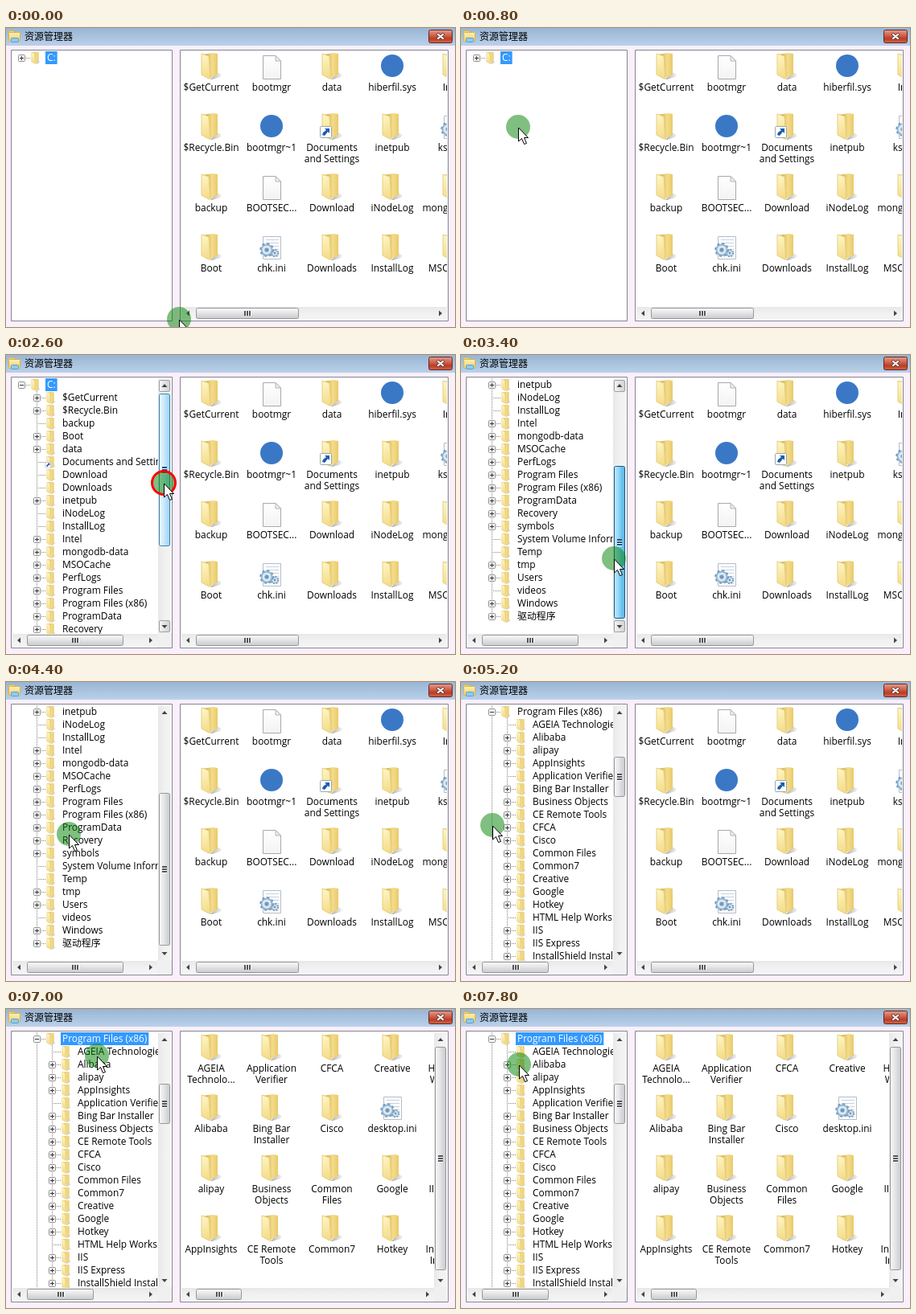
Recreate the animation shown at these times as an HTML page with a canvas. Size 558x372 px, loop 8000 ms.

```html
<!DOCTYPE html>
<html lang="zh">
<head>
<meta charset="utf-8">
<title>资源管理器</title>
<style>
html, body { margin: 0; width: 100%; height: 100%; overflow: hidden; }
canvas { display: block; width: 100%; height: 100%; }
</style>
</head>
<body>
<canvas id="stage" width="558" height="372"></canvas>
<script>
const ctx = document.getElementById('stage').getContext('2d');
const STEP = 200, STEPS = 40;
const FAMILY = '"Open Sans", "Noto Sans CJK SC", "Noto Sans CJK", sans-serif';
const FONT = '11.9px ' + FAMILY, TITLE_FONT = '12px ' + FAMILY;

// A leading "+" marks a folder that can be expanded.
const parse = list => list.split(',').map(s => ({ name: s.replace('+', ''), more: s[0] === '+' }));
const ROOT = parse('+$GetCurrent,+$Recycle.Bin,backup,+Boot,+data,Documents and Settings,Download,Downloads,+inetpub,' +
  'iNodeLog,InstallLog,+Intel,+mongodb-data,+MSOCache,+PerfLogs,+Program Files,+Program Files (x86),+ProgramData,' +
  '+Recovery,+symbols,System Volume Information,Temp,+tmp,+Users,videos,+Windows,+驱动程序');
const PROGRAMS = parse('AGEIA Technologies,+Alibaba,+alipay,+AppInsights,Application Verifier,+Bing Bar Installer,' +
  '+Business Objects,+CE Remote Tools,+CFCA,+Cisco,+Common Files,+Common7,+Creative,+Google,+Hotkey,' +
  'HTML Help Workshop,+IIS,+IIS Express,+InstallShield Installation Information');
const OPENED = 'Program Files (x86)';

// Icon grids run down the columns; "|" breaks a label into lines.
const DRIVE_GRID = ('$GetCurrent,$Recycle.Bin,backup,Boot,bootmgr,bootmgr~1,BOOTSEC...,chk.ini,data,Documents|and Settings,' +
  'Download,Downloads,hiberfil.sys,inetpub,iNodeLog,InstallLog,Intel,ksuser,mongod-data,MSOCache').split(',');
const PROGRAM_GRID = ('AGEIA|Technolo...,Alibaba,alipay,AppInsights,Application|Verifier,Bing Bar|Installer,Business|Objects,' +
  'CE Remote|Tools,CFCA,Cisco,Common|Files,Common7,Creative,desktop.ini,Google,Hotkey,HTML Help|Workshop,IIS,' +
  'IIS Express,InstallShield|Installati...').split(',');
const ICONS = { bootmgr: page, 'BOOTSEC...': page, 'bootmgr~1': badge, 'hiberfil.sys': badge,
  'chk.ini': settings, ksuser: settings, 'desktop.ini': settings };

// Pointer stops: step, x, y
const POINTER = [[0, 215, 362], [6, 20, 39], [8, 20, 39], [12, 195, 157], [13, 196, 159], [17, 190, 253], [18, 190, 253],
  [24, 39, 166], [25, 39, 166], [26, 39, 178], [30, 112, 41], [32, 110, 39], [33, 110, 39], [36, 115, 67], [39, 72, 69]];

function fillRect(x, y, w, h, color) {
  ctx.fillStyle = color;
  ctx.fillRect(x, y, w, h);
}

function gradient(x0, y0, x1, y1, ...colors) {
  const g = ctx.createLinearGradient(x0, y0, x1, y1);
  colors.forEach((c, i) => g.addColorStop(i / (colors.length - 1), c));
  return g;
}

function poly(points, fill, stroke) {
  ctx.beginPath();
  for (let i = 0; i < points.length; i += 2) ctx.lineTo(points[i], points[i + 1]);
  ctx.closePath();
  if (fill) { ctx.fillStyle = fill; ctx.fill(); }
  if (stroke) { ctx.strokeStyle = stroke; ctx.stroke(); }
}

function disc(x, y, r, fill) {
  ctx.beginPath();
  ctx.arc(x, y, r, 0, Math.PI * 2);
  ctx.fillStyle = fill;
  ctx.fill();
}

function roundBox(x, y, w, h, r, fill, stroke) {
  ctx.beginPath();
  ctx.roundRect(x, y, w, h, r);
  ctx.fillStyle = fill;
  ctx.fill();
  ctx.strokeStyle = stroke;
  ctx.stroke();
}

function text(s, x, y, color = '#000', align = 'left', font = FONT) {
  ctx.font = font;
  ctx.fillStyle = color;
  ctx.textAlign = align;
  ctx.fillText(s, x, y + 4);
}

function at(x, y, scale, draw) {
  ctx.save();
  ctx.translate(x, y);
  ctx.scale(scale, scale);
  draw();
  ctx.restore();
}

function clipped(x, y, w, h, draw) {
  ctx.save();
  ctx.beginPath();
  ctx.rect(x, y, w, h);
  ctx.clip();
  draw();
  ctx.restore();
}

function folder() {
  poly([-1, 17, 7, 8, 13, 11, 11, 14, 1, 17], gradient(0, 0, 13, 0, 'rgba(80,80,80,.45)', 'rgba(120,120,120,.1)'));
  poly([-11, -14, 2, -16, 8, -15, 8, 11, -1, 15], gradient(-6, 0, 8, 0, '#d9b44c', '#f3dc8c', '#e9ca6a'));
  poly([-12, -15, -3, -12, -1, 16, -3, 16, -12, 11], gradient(-12, -14, 0, 14, '#fff6c6', '#f3db85'), '#e6cd82');
}

function page() {
  poly([-10.5, -12.5, 5, -12.5, 11.5, -6, 11.5, 16.5, -10.5, 16.5], gradient(0, -12, 0, 16, '#fff', '#f3f3f3'), '#a9a9a9');
  poly([5, -12.5, 5, -6, 11.5, -6], '#eee', '#b5b5b5');
}

function gear(x, y, r) {
  ctx.setLineDash([r * .4, r * .385]);
  ctx.lineWidth = 2.5;
  ctx.strokeStyle = '#6a93b5';
  ctx.beginPath();
  ctx.arc(x, y, r, 0, 7);
  ctx.stroke();
  ctx.setLineDash([]);
  ctx.lineWidth = 1;
  disc(x, y, r, '#8fb2cf');
  disc(x, y, r * .75, '#dbe9f3');
  disc(x, y, r * .35, '#7499b7');
}

function settings() {
  poly([-10.5, -12.5, 11.5, -12.5, 11.5, 15.5, -10.5, 15.5], '#fdfdfd', '#b4bec9');
  for (let y = -9; y < 13; y += 4) fillRect(-7, y, 16, 1, '#c7d3e0');
  gear(4, 8, 4);
  gear(-6, 4, 7.5);
}

function badge() { disc(0, 0, 14, '#3a78c6'); }

function shortcut() {
  roundBox(-14.5, .5, 14, 14, 1, '#fff', '#9aa');
  poly([-9, 3, -3, 3, -3, 9, -5, 7, -9, 12, -12, 11, -11, 8, -7, 5], '#1c5cb0');
}

function dots(x0, y0, x1, y1) {
  ctx.setLineDash([1, 1]);
  ctx.strokeStyle = '#848484';
  ctx.beginPath();
  ctx.moveTo(x0, y0);
  ctx.lineTo(x1, y1);
  ctx.stroke();
  ctx.setLineDash([]);
}

function expander(x, y, open) {
  roundBox(x - 3.5, y - 4, 8, 8, 1, '#fff', '#8c8c8c');
  fillRect(x - 2, y - .5, 5, 1, '#333');
  if (!open) fillRect(x, y - 2.5, 1, 5, '#333');
}

// mode: 0 idle, 1 hovered, 2 pressed
function scrollbar(x, y, length, start, size, vertical, mode = 0) {
  const fills = [['#f7f7f7', '#ececee', '#d8d9dc', '#c9cacd'], ['#e8f6fd', '#d5effc', '#b4dff7', '#9ed3ee'],
    ['#c3e9fb', '#a1dcf8', '#6cc5f0', '#5bb4e0']];
  const edge = ['#979797', '#3c7fb1', '#18598a'][mode];
  ctx.save();
  vertical ? ctx.transform(0, 1, 1, 0, x, y) : ctx.translate(x, y);
  fillRect(0, 0, length, 16, gradient(0, 0, 0, 16, '#e8e8e8', '#f1f1f1', '#f4f4f4'));
  if (mode) for (const b of [1.5, length - 15.5])
    roundBox(b, 1.5, 14, 13, 1.5, gradient(0, 1, 0, 15, '#f8f8f8', '#e2e2e4', '#d0d1d4'), '#a0a0a0');
  poly([6, 8, 10, 4.5, 10, 11.5], '#444');
  poly([length - 6, 8, length - 10, 4.5, length - 10, 11.5], '#444');
  roundBox(start + .5, 1.5, size - 1, 13, 2, gradient(0, 1, 0, 15, ...fills[mode]), edge);
  const mid = Math.round(start + size / 2);
  for (let i = -4; i <= 2; i += 3) {
    fillRect(mid + i, 5, 2, 6, mode ? '#22506e' : '#555');
    fillRect(mid + i + 2, 5, 1, 6, '#fff');
  }
  ctx.restore();
}

function treeRows(step) {
  const rows = [{ name: 'C:', depth: 0, more: true, open: step >= 7 }];
  if (step < 7) return rows;
  ROOT.forEach((item, i) => {
    const open = item.name === OPENED && step >= 25;
    rows.push({ ...item, depth: 1, open, last: i === ROOT.length - 1 });
    if (open) PROGRAMS.forEach(p => rows.push({ ...p, depth: 2 }));
  });
  return rows;
}

function drawRow(row, y, selected) {
  const indent = 19 * row.depth, x = 19 + indent, textX = 51 + indent;
  if (row.depth) {
    dots(38.5, y - 8, 38.5, row.last ? y : y + 8);
    if (row.depth === 2) dots(57.5, y - 8, 57.5, y + 8);
  }
  dots(x, y + .5, x + 12, y + .5);
  if (row.more) expander(x, y + .5, row.open);
  at(37 + indent, y, .45, folder);
  if (row.name === 'Documents and Settings') at(37 + indent, y, .5, shortcut);
  if (selected) {
    ctx.font = FONT;
    fillRect(textX - 2, y - 8, ctx.measureText(row.name).width + 4, 16, '#3399ff');
  }
  text(row.name, textX, y, selected ? '#fff' : '#000');
}

function drawTree(step) {
  const drag = Math.min(1, Math.max(0, (step - 13) / 4));
  const inside = step >= 25;
  const first = inside ? 17 : Math.round(9 * drag);
  const selected = step >= 32 ? OPENED : 'C:';
  const expanded = step >= 7;
  clipped(8, 29, expanded ? 181 : 198, expanded ? 318 : 335, () =>
    treeRows(step).slice(first, first + 20).forEach((row, i) => drawRow(row, 37 + 16 * i, row.name === selected)));
  if (!expanded) return;
  const mode = step >= 14 && step <= 18 ? 2 : step === 12 || step === 13 ? 1 : 0;
  fillRect(188, 346, 18, 18, '#f0f0f0');
  scrollbar(8, 347, 180, 18, inside ? 83 : 120, false);
  if (inside) scrollbar(189, 30, 316, 63, 50, true);
  else scrollbar(189, 30, 316, 18 + 90 * drag, 190, true, mode);
}

function drawGrid(step) {
  const inside = step >= 33;
  const width = inside ? 314 : 330;
  clipped(218, 29, width, 318, () => (inside ? PROGRAM_GRID : DRIVE_GRID).forEach((label, i) => {
    const x = 255 + 75 * Math.floor(i / 4), y = 47 + 75 * (i % 4);
    at(x, y, 1, ICONS[label] || folder);
    if (label.startsWith('Documents')) at(x, y, 1, shortcut);
    label.split('|').forEach((line, n) => text(line, x, y + 27 + 14 * n, '#000', 'center'));
  }));
  scrollbar(218, 347, width, 18, inside ? 57 : 128, false);
  if (inside) {
    fillRect(532, 346, 16, 18, '#f0f0f0');
    scrollbar(532, 30, 316, 17, 278, true);
  }
}

function drawWindow() {
  fillRect(0, 0, 558, 372, '#faeffa');
  fillRect(0, 0, 558, 22, gradient(0, 0, 0, 22, '#99b5d3', '#a9c3df', '#bad1e9'));
  roundBox(3.5, 3.5, 7, 4, 1, '#f3d774', '#d9b34c');
  roundBox(3.5, 5.5, 14, 11, 1, gradient(0, 5, 0, 17, '#fff1b5', '#f0ce67'), '#d9b34c');
  roundBox(6.5, 12.5, 9, 5, 1, '#8fcbef', '#5d9fca');
  text('资源管理器', 23, 11, '#000', 'left', TITLE_FONT);
  roundBox(525.5, 2.5, 29, 16, 2, gradient(0, 2, 0, 19, '#e6a08c', '#d4705a', '#bd3c24', '#d36a4c'), '#5e2a2c');
  ctx.lineCap = 'round';
  for (const [color, width] of [['#6b3a3a', 4], ['#fff', 2.2]]) {
    ctx.strokeStyle = color;
    ctx.lineWidth = width;
    ctx.beginPath();
    ctx.moveTo(537, 8); ctx.lineTo(543, 13);
    ctx.moveTo(543, 8); ctx.lineTo(537, 13);
    ctx.stroke();
  }
  ctx.lineCap = 'butt';
  ctx.lineWidth = 1;
  roundBox(6.5, 27.5, 200, 337, 0, '#fff', '#828790');
  roundBox(216.5, 27.5, 333, 337, 0, '#fff', '#828790');
}

function pointerAt(step) {
  const i = Math.max(1, POINTER.findIndex(p => p[0] >= step));
  const [s0, x0, y0] = POINTER[i - 1], [s1, x1, y1] = POINTER[i];
  const u = (step - s0) / (s1 - s0);
  const e = s1 - s0 > 4 ? u * u * (3 - 2 * u) : u;
  return [Math.round(x0 + (x1 - x0) * e), Math.round(y0 + (y1 - y0) * e)];
}

function drawPointer(step) {
  const [x, y] = pointerAt(step);
  const pressed = [6, 24, 32].includes(step) || (step >= 13 && step <= 16);
  disc(x, y, 15, 'rgba(0,128,0,.5)');
  if (pressed) {
    ctx.beginPath();
    ctx.arc(x, y, 14.5, 0, Math.PI * 2);
    ctx.strokeStyle = '#f00';
    ctx.lineWidth = 3;
    ctx.stroke();
    ctx.lineWidth = 1;
  }
  at(x + .5, y + 1, 1, () =>
    poly([0, 0, 0, 17, 4, 13.5, 7, 20.5, 10, 19.5, 7, 12.5, 12, 12.5], '#fff', '#000'));
}

function frame(now) {
  const step = Math.floor(now / STEP) % STEPS;
  drawWindow();
  drawTree(step);
  drawGrid(step);
  drawPointer(step);
  requestAnimationFrame(frame);
}
requestAnimationFrame(frame);
</script>
</body>
</html>
```
